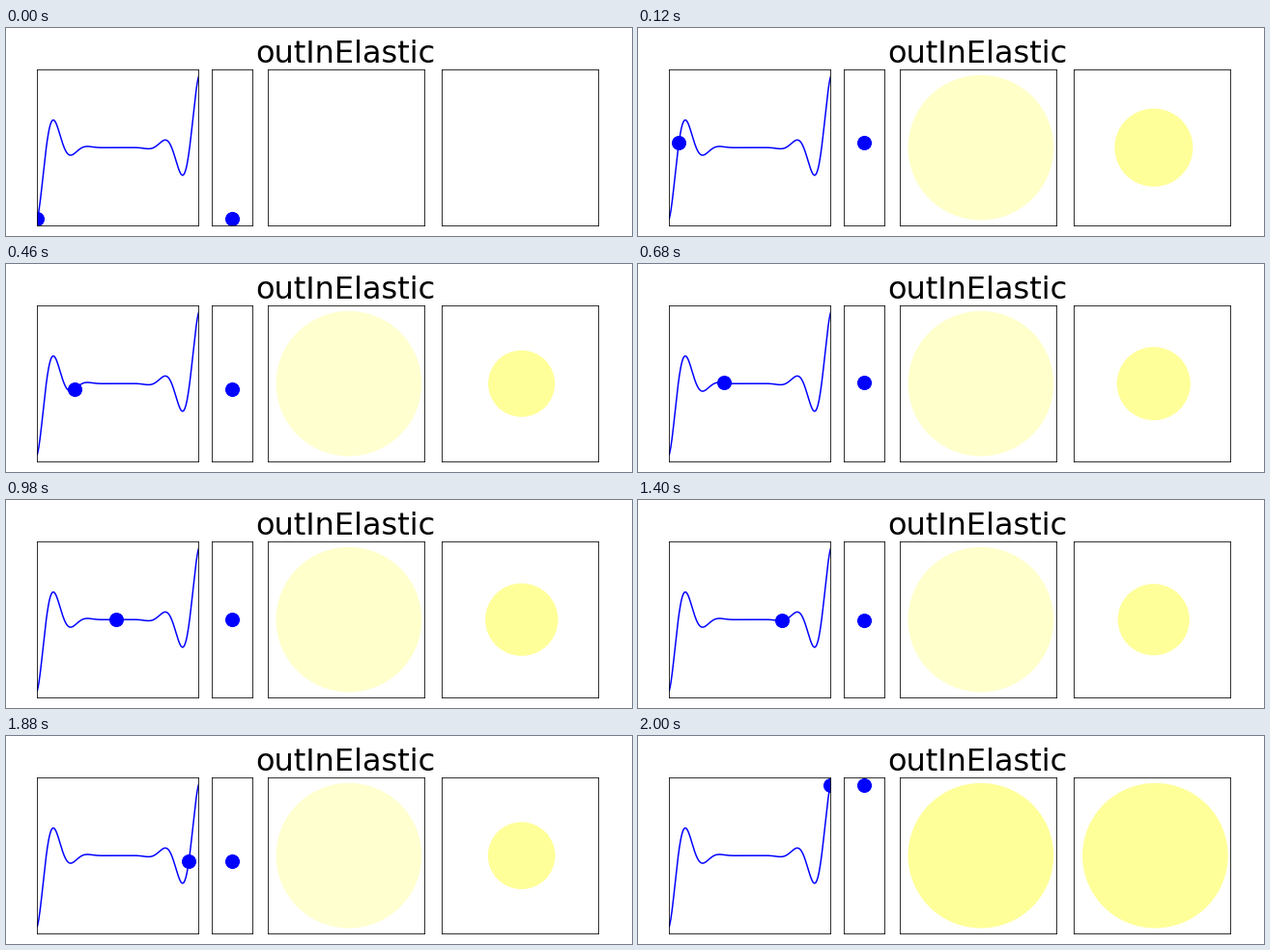
A matplotlib script that plays this animation: 648 by 216 pixels, repeating every 2020 ms.

```python
import numpy as np
import matplotlib.pyplot as plt
from matplotlib.animation import FuncAnimation
from matplotlib.patches import Circle

FRAMES = 101
INTERVAL = 20
MARK_COLOR = "#ffff99"
MARK_CENTER = np.array([0.52, 0.5])
MARK_RADIUS = 0.465


def in_elastic(t):
    return t**4 * np.sin(4.5 * np.pi * t)


def out_elastic(t):
    return 1 - in_elastic(1 - t)


def out_in_elastic(t):
    return np.where(t < 0.5,
                    out_elastic(2 * t) / 2,
                    (1 + in_elastic(2 * t - 1)) / 2)


def add_ball(ax):
    return ax.plot([], [], "o", color="b", markersize=14)[0]


def add_mark(ax):
    ax.set(xlim=(0, 1), ylim=(0, 1), aspect="equal")
    return ax.add_patch(Circle(MARK_CENTER, MARK_RADIUS, fc=MARK_COLOR, lw=0))


plt.rcParams["font.family"] = "DejaVu Sans"
fig, axes = plt.subplots(
    1, 4, figsize=(9, 3), dpi=72,
    gridspec_kw=dict(width_ratios=[4, 1, 4, 4], wspace=0.1,
                     left=0.05, right=0.95, bottom=0.05, top=0.8))
curve_ax, ball_ax, fade_ax, zoom_ax = axes
for ax in axes:
    ax.set(xticks=[], yticks=[])

times = np.linspace(0, 1, 401)
curve_ax.plot(times, out_in_elastic(times), color="b", lw=1.5)
curve_ax.set(xlim=(0, 1), ylim=(-0.05, 1.05))
ball_ax.set(xlim=(-1, 1), ylim=(-0.05, 1.05))
fade_ax.set_title("outInElastic", fontsize=32)

curve_ball, ball = add_ball(curve_ax), add_ball(ball_ax)
fade_mark, zoom_mark = add_mark(fade_ax), add_mark(zoom_ax)


def update(i):
    t = i / (FRAMES - 1)
    value = float(np.clip(out_in_elastic(t), 0, 1))
    curve_ball.set_data([t], [value])
    ball.set_data([0], [value])
    fade_mark.set_alpha(value)
    zoom_mark.set_center(0.5 + (MARK_CENTER - 0.5) * value)
    zoom_mark.set_radius(MARK_RADIUS * value)
    return curve_ball, ball, fade_mark, zoom_mark


anim = FuncAnimation(fig, update, frames=FRAMES, interval=INTERVAL,
                     repeat=True, repeat_delay=0)
plt.show()
```
